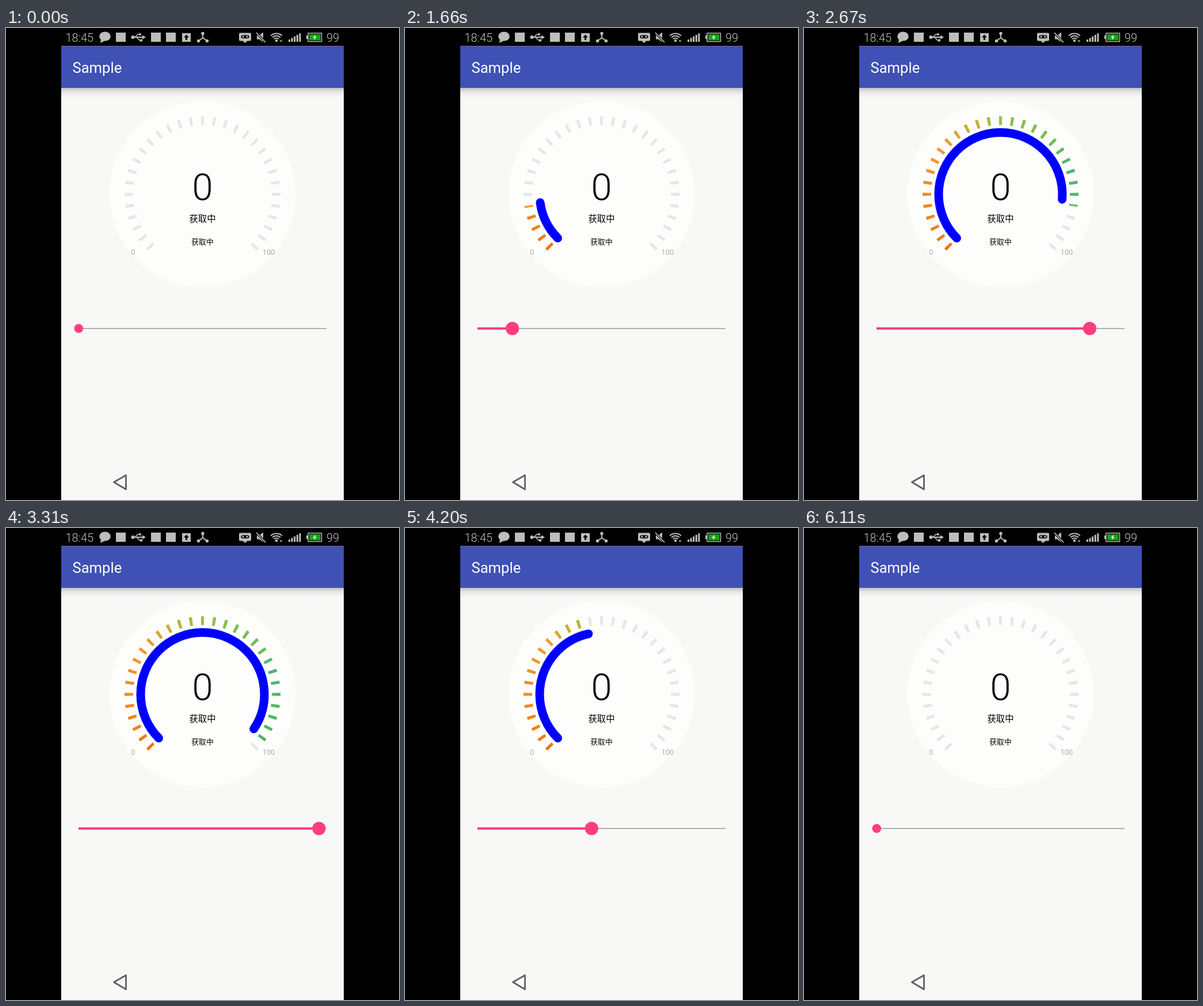
Animation, 683 px wide and 820 px high, one loop 7130 ms. Source, as an HTML page with a canvas:

```html
<!DOCTYPE html>
<html lang="zh">
<head>
<meta charset="utf-8">
<title>Gauge sample</title>
<style>
html, body { margin: 0; height: 100%; overflow: hidden; background: #000; }
canvas { display: block; }
</style>
</head>
<body>
<canvas id="stage" width="683" height="820"></canvas>
<script>
const ctx = document.getElementById('stage').getContext('2d');
const LOOP = 7130, STEP = LOOP / 56;
const FIRST_PRESSED = 9;
// Slider percentage for each step while the thumb is held.
const DRAG = [0, 2, 5, 9, 14, 22, 32, 41, 50, 57, 64, 69.6, 86, 96, 100,
  100, 100, 97, 92, 86, 80, 74, 68, 58, 46, 34, 22, 10, 0];
const CX = 341.5, CY = 289;
const LEFT = 96, WIDTH = 491;
const ICON = '#bdbdbd';
const PINK = '#ff3d7f';
const PAGE = '#f8f8f7';
const rad = deg => deg * Math.PI / 180;

const heat = ctx.createConicGradient(rad(125), CX, CY);
[[0, '#f77408'], [10, '#f77408'], [46, '#fb8519'], [91, '#ee9735'], [118, '#d0ac2e'],
 [145, '#96c046'], [190, '#6cbd50'], [217, '#4cb573'], [244, '#52b85e'],
 [280, '#4cb562'], [360, '#4cb562']].forEach(([deg, color]) => heat.addColorStop(deg / 360, color));

function rect(x, y, w, h, color) {
  ctx.fillStyle = color;
  ctx.fillRect(x, y, w, h);
}

function disc(x, y, r, color) {
  ctx.fillStyle = color;
  ctx.beginPath();
  ctx.arc(x, y, r, 0, 2 * Math.PI);
  ctx.fill();
}

function line(points, color, width, closed) {
  ctx.strokeStyle = color;
  ctx.lineWidth = width;
  ctx.beginPath();
  points.forEach(([x, y]) => ctx.lineTo(x, y));
  if (closed) ctx.closePath();
  ctx.stroke();
}

function polygon(points, color) {
  ctx.fillStyle = color;
  ctx.beginPath();
  points.forEach(([x, y]) => ctx.lineTo(x, y));
  ctx.fill();
}

function arc(x, y, r, from, to, color, width, cap = 'butt') {
  ctx.strokeStyle = color;
  ctx.lineWidth = width;
  ctx.lineCap = cap;
  ctx.beginPath();
  ctx.arc(x, y, r, rad(from), rad(to));
  ctx.stroke();
  ctx.lineCap = 'butt';
}

function rounded(x, y, w, h, r, color) {
  ctx.fillStyle = color;
  ctx.beginPath();
  ctx.roundRect(x, y, w, h, r);
  ctx.fill();
}

function text(str, x, y, size, color, align = 'center', weight = 300) {
  ctx.font = `${weight} ${size}px Roboto, "Noto Sans CJK SC", "Noto Sans CJK", sans-serif`;
  ctx.textAlign = align;
  ctx.fillStyle = color;
  ctx.fillText(str, x, y);
}

function leftIcons() {
  // chat bubble
  ctx.fillStyle = ICON;
  ctx.beginPath();
  ctx.ellipse(172, 14.5, 9.8, 8, 0, 0, 2 * Math.PI);
  ctx.fill();
  polygon([[165, 19], [164, 26], [172, 22]], ICON);

  // app badges
  [191, 252, 278].forEach(x => rect(x, 8, 17, 16, ICON));

  // cable
  line([[220, 16], [238, 16]], ICON, 2);
  line([[224, 16], [229, 11], [233, 11]], ICON, 1.6);
  line([[227, 16], [232, 21.5], [235, 21.5]], ICON, 1.6);
  polygon([[237, 12.5], [243, 16], [237, 19.5]], ICON);
  disc(220.5, 16, 3, ICON);
  disc(233, 11, 2, ICON);
  rect(233, 19.5, 4, 4, ICON);

  // upload
  rect(306, 9, 15, 15, ICON);
  polygon([[313.5, 11.5], [318, 16.5], [309, 16.5]], '#000');
  rect(312, 16, 3, 5, '#000');

  // linked nodes
  line([[342, 10], [342, 17], [334, 23]], ICON, 2);
  line([[342, 17], [350, 23]], ICON, 2);
  [[342, 9.5], [334.5, 22.5], [349.5, 22.5]].forEach(([x, y]) => disc(x, y, 2.7, ICON));
}

function rightIcons() {
  // message
  rounded(405, 8.5, 21, 14, 2, ICON);
  polygon([[411, 22], [420, 22], [415.5, 26]], ICON);
  rounded(408.5, 12.5, 14, 5.5, 2.7, '#000');
  disc(412, 15.2, 1.6, ICON);
  disc(419, 15.2, 1.6, ICON);

  // muted speaker
  polygon([[436, 13], [440, 13], [447, 7.5], [447, 24.5], [440, 19.5], [436, 19.5]], ICON);
  line([[435, 8], [451, 25]], '#000', 4);
  line([[435, 8], [451, 25]], ICON, 1.8);

  // wireless
  [14, 10, 6].forEach(r => arc(470, 23.5, r, 226, 314, ICON, 2));
  disc(470, 22, 2.2, ICON);
  polygon([[475.5, 21.5], [480.5, 21.5], [478, 24.5]], ICON);

  // signal
  for (let i = 0; i < 5; i++) rect(491 + i * 4.6, 20 - i * 2.7, 3, 4 + i * 2.7, ICON);

  // battery
  ctx.strokeStyle = ICON;
  ctx.lineWidth = 1.5;
  ctx.strokeRect(525, 9, 23.5, 14.5);
  rect(522, 13, 3, 6, ICON);
  rect(527, 11, 19.5, 10.5, '#13a513');
  polygon([[538, 11.5], [533, 17], [536, 17], [535, 21], [540, 15.5], [537, 15.5]], '#e8f5e8');
}

function screen() {
  rect(0, 0, 683, 820, '#000');
  rect(LEFT, 31, WIDTH, 789, PAGE);

  const shadow = ctx.createLinearGradient(0, 104, 0, 120);
  shadow.addColorStop(0, '#c0c0c2');
  shadow.addColorStop(0.4, '#e4e4e5');
  shadow.addColorStop(1, PAGE);
  rect(LEFT, 104, WIDTH, 16, shadow);
  rect(LEFT, 31, WIDTH, 73, '#3f51b5');
  rect(LEFT, 31, WIDTH, 1, '#74699a');
  text('Sample', 115.5, 78, 25.6, '#fff', 'left', 400);

  text('18:45', 103.5, 24, 20, '#c4c4c4', 'left');
  text('99', 557, 24, 20, '#c4c4c4', 'left');
  leftIcons();
  rightIcons();

  ctx.lineJoin = 'round';
  line([[187.5, 789], [208.5, 777], [208.5, 801.5]], '#5f6065', 2.8, true);
}

function gauge(value) {
  disc(CX, 288.5, 162, '#fdfdfc');

  const cut = 270 + 275 * (value - 0.5);
  for (let i = 0; i <= 30; i++) {
    const from = 135 + 9 * i - 1.12, to = from + 2.24;
    arc(CX, CY, 128, from, to, '#e6e6e8', 15);
    if (value > 0 && cut > from) arc(CX, CY, 128, from, Math.min(to, cut), heat, 15);
  }
  if (value > 0) arc(CX, CY, 107.5, 135, 135 + 267 * value, '#00f', 15, 'round');

  text('0', CX, 298.5, 65, '#000');
  text('获取中', CX, 336.5, 15.36, '#000', 'center', 400);
  text('获取中', CX, 376, 12.8, '#000', 'center', 400);
  text('0', 220.8, 394, 12.8, '#858585');
  text('100', 456.5, 394, 12.8, '#858585');
}

function slider(value, pressed) {
  const x = 126.3 + 430.5 * value;
  rect(126, 521.4, 431, 1.3, '#8c8c8c');
  rect(126, 520, x - 126, 4, PINK);
  disc(x, 522, pressed ? 11.6 : 7.8, PINK);
}

function draw(now) {
  const step = Math.floor((now % LOOP + 5) / STEP);
  const percent = DRAG[step - FIRST_PRESSED];
  const value = (percent || 0) / 100;
  screen();
  gauge(value);
  slider(value, percent !== undefined);
}

const start = performance.now();
function tick() {
  draw(performance.now() - start);
  requestAnimationFrame(tick);
}
tick();
</script>
</body>
</html>
```
